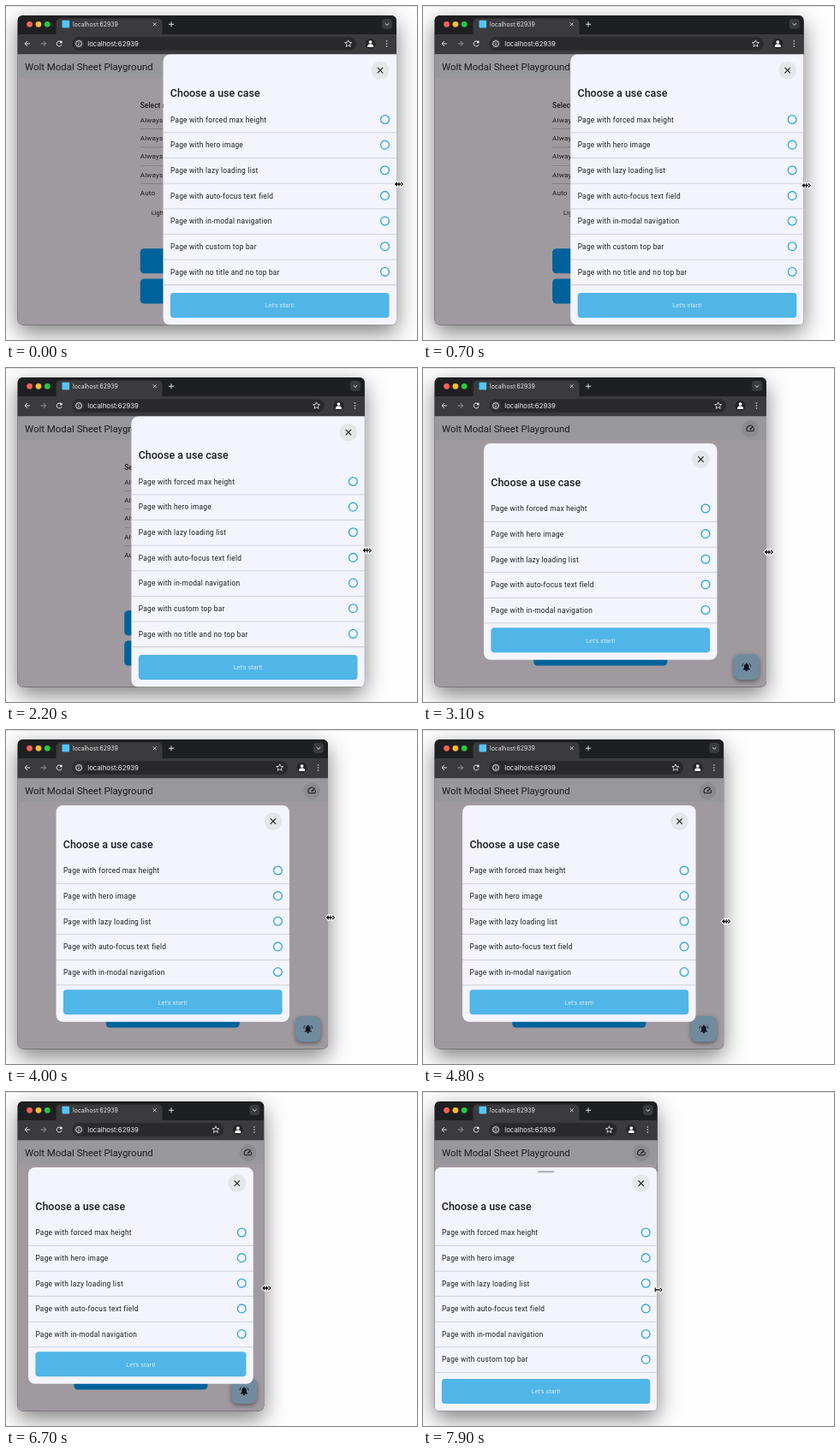
An HTML page with a canvas for the animation above (8 s loop, 480 by 390 pixels).

```html
<!DOCTYPE html>
<html lang="en">
<head>
<meta charset="utf-8">
<title>Resizing a modal sheet</title>
<style>
html, body { margin: 0; width: 100%; height: 100%; overflow: hidden; background: #fff; }
canvas { display: block; width: 480px; height: 390px; }
</style>
</head>
<body>
<canvas id="stage"></canvas>
<script>
const W = 480, H = 390, LOOP = 8000, STEP = 100;
const LEFT = 13.5, TOP = 11, PAGE_TOP = 56.5, BOTTOM = 372.5;
const SCALE = 0.52;
const SHEET_WIDTH = 524 * SCALE, DIALOG_BREAKPOINT = 768 * SCALE, MIN_RIGHT = 273.7;
const ROW = 57 * SCALE;

// time, right edge of the window, pointer y
const drag = [
  [0, 456, 208], [900, 441.5, 210], [1400, 434, 211], [1800, 426, 212],
  [2700, 410, 214], [3100, 401, 215], [3600, 384.5, 217], [4000, 376, 219],
  [4500, 358.5, 222], [5400, 336.5, 226.5], [5500, 333.5, 227], [6300, 308, 228.5],
  [6700, 301.3, 229], [7200, 289, 230], [7600, MIN_RIGHT, 231], [8000, MIN_RIGHT, 231]
];

const useCases = [
  'Page with forced max height', 'Page with hero image', 'Page with lazy loading list',
  'Page with auto-focus text field', 'Page with in-modal navigation',
  'Page with custom top bar', 'Page with no title and no top bar'
];

const canvas = document.getElementById('stage');
const ctx = canvas.getContext('2d');
const dpr = window.devicePixelRatio || 1;
canvas.width = W * dpr;
canvas.height = H * dpr;

function dragAt(t) {
  const i = Math.max(1, drag.findIndex(k => k[0] > t));
  const [t0, r0, y0] = drag[i - 1], [t1, r1, y1] = drag[i];
  const p = (t - t0) / (t1 - t0);
  return { right: r0 + (r1 - r0) * p, y: y0 + (y1 - y0) * p };
}

function box(x, y, w, h, radius, fill) {
  ctx.beginPath();
  ctx.roundRect(x, y, w, h, radius);
  ctx.fillStyle = fill;
  ctx.fill();
}

function disc(x, y, r, fill) {
  ctx.beginPath();
  ctx.arc(x, y, r, 0, Math.PI * 2);
  ctx.fillStyle = fill;
  ctx.fill();
}

function ring(x, y, r, color, width, from = 0, to = Math.PI * 2) {
  ctx.beginPath();
  ctx.arc(x, y, r, from, to);
  ctx.strokeStyle = color;
  ctx.lineWidth = width;
  ctx.stroke();
}

function line(color, width, ...points) {
  ctx.beginPath();
  points.forEach(([x, y]) => ctx.lineTo(x, y));
  ctx.strokeStyle = color;
  ctx.lineWidth = width;
  ctx.stroke();
}

function label(str, x, y, size, color, { weight = 400, spacing = 0, align = 'left', font = 'Roboto' } = {}) {
  ctx.font = `${weight} ${size}px ${font}, sans-serif`;
  ctx.letterSpacing = spacing + 'px';
  ctx.textAlign = align;
  ctx.textBaseline = 'alphabetic';
  ctx.fillStyle = color;
  ctx.fillText(str, x, y + size * 0.355);
}

function cross(x, y, r, color, width) {
  line(color, width, [x - r, y - r], [x + r, y + r]);
  line(color, width, [x - r, y + r], [x + r, y - r]);
}

function arrow(x, y, dir, color) {
  line(color, 1, [x - 3 * dir, y], [x + 3 * dir, y]);
  line(color, 1, [x, y - 3], [x + 3 * dir, y], [x, y + 3]);
}

function star(x, y) {
  const points = Array.from({ length: 11 }, (_, i) => {
    const a = i * Math.PI / 5 - Math.PI / 2, r = i % 2 ? 1.9 : 4.2;
    return [x + r * Math.cos(a), y + r * Math.sin(a)];
  });
  line('#dedee0', 0.9, ...points);
}

function drawTabs(right) {
  const y = 21.3;
  box(LEFT, TOP, right - LEFT, 24, 0, '#1e1f21');
  ['#ff5f57', '#febc2e', '#28c840'].forEach((c, i) => disc(27.6 + i * 10.3, y, 3.4, c));
  box(58.5, 14.5, 124, 20, [5, 5, 0, 0], '#3b3b3d');
  box(65.5, 16.8, 8.6, 8.6, 1, '#54c5f8');
  label('localhost:62939', 78, y, 6.9, '#e6e6e8', { font: 'Inter' });
  cross(173.7, y, 1.9, '#dedee0', 0.9);
  line('#dedee0', 1, [190, y], [196, y]);
  line('#dedee0', 1, [193, y - 3], [193, y + 3]);
  box(right - 17, 15, 12, 12, 4, '#3a3b3d');
  line('#e6e6e8', 1, [right - 13.2, y - 1], [right - 11, y + 1.1], [right - 8.8, y - 1]);
}

function drawToolbar(right) {
  const y = 44;
  box(LEFT, 33, right - LEFT, 24, 0, '#3b3b3d');
  arrow(25, y, -1, '#dedee0');
  arrow(43.7, y, 1, '#98989b');
  ring(62.2, y, 3, '#dedee0', 1, 0.3, 5.5);
  box(63, 40.8, 2.6, 2.6, 0, '#dedee0');
  box(77.5, 36.3, right - 124.5, 15.4, 7.7, '#29292b');
  disc(85, y, 5.6, '#3d3d40');
  ring(85, y, 3.4, '#e4e4e6', 0.9);
  line('#e4e4e6', 0.9, [85, y - 0.3], [85, y + 1.9]);
  disc(85, y - 1.6, 0.5, '#e4e4e6');
  label('localhost:62939', 95.3, y, 7.8, '#ececee', { font: 'Inter' });
  star(right - 56.3, y);
  disc(right - 30.4, y, 6, '#242426');
  disc(right - 30.4, y - 1.9, 1.9, '#fff');
  box(right - 33.8, y + 0.5, 6.8, 3.4, [2.5, 2.5, 0.5, 0.5], '#fff');
  [-3, 0, 3].forEach(d => disc(right - 11.4, y + d, 0.8, '#dedee0'));
}

function drawSpeedButton(x, y) {
  disc(x, y, 10, '#8b8b90');
  ring(x, y + 0.4, 4.3, '#1b1a1d', 1.1, Math.PI * 0.83, Math.PI * 1.78);
  ring(x, y + 0.4, 4.3, '#1b1a1d', 1.1, Math.PI * 1.9, Math.PI * 2.17);
  line('#1b1a1d', 1, [x - 3.9, y + 2.7], [x + 3.9, y + 2.7]);
  line('#1b1a1d', 1.5, [x - 0.5, y + 1], [x + 3.2, y - 2.5]);
}

function drawBellButton(x, y) {
  ctx.save();
  ctx.shadowColor = 'rgba(0,0,0,.42)';
  ctx.shadowBlur = 5 * dpr;
  ctx.shadowOffsetY = 2 * dpr;
  box(x - 15, y - 15, 30, 30, 8, '#718b9e');
  ctx.restore();
  const ink = '#0c1720';
  box(x - 2.8, y - 3.6, 5.6, 6.6, [2.8, 2.8, 0, 0], ink);
  box(x - 4, y + 2.3, 8, 1.2, 0, ink);
  disc(x, y - 3.8, 0.9, ink);
  disc(x, y + 4.2, 1.1, ink);
  ring(x, y - 0.5, 5, ink, 0.9, Math.PI, Math.PI * 1.26);
  ring(x, y - 0.5, 5, ink, 0.9, Math.PI * 1.74, Math.PI * 2);
}

function drawPage(right) {
  const center = (LEFT + right) / 2, x = center - 78;
  const ink = '#1c1a1d';
  box(LEFT, PAGE_TOP, right - LEFT, BOTTOM - PAGE_TOP, 0, '#9f9a9f');
  box(LEFT, PAGE_TOP, right - LEFT, 27.5, 0, '#98989c');
  label('Wolt Modal Sheet Playground', 22, 70.5, 11.44, ink);
  drawSpeedButton(right - 18.8, 71);

  label('Select modal', x, 116.2, 8.32, ink, { weight: 500, spacing: 0.08 });
  for (let i = 0; i < 5; i++) {
    const y = 133 + i * 21.3;
    label(i < 4 ? 'Always show' : 'Auto', x, y, 8.1, ink, { spacing: 0.15 });
    if (i < 4) box(x, y + 10.3, 156, 0.7, 0, '#77737a');
  }
  label('Light', center - 65, 241.5, 7.28, ink, { spacing: 0.05 });
  [283.3, 318.5].forEach(y => box(x, y, 156, 29, 4.5, '#00629a'));
  drawBellButton(right - 23.2, 349);
}

function sheetFor(right) {
  const width = right - LEFT;
  if (width < SHEET_WIDTH)
    return { x: LEFT, y: 88, w: width, bottom: BOTTOM, rows: 6, radius: [8, 8, 0, 0], handle: true };
  if (width < DIALOG_BREAKPOINT) {
    const w = Math.min(SHEET_WIDTH, width - 25);
    return { x: LEFT + (width - w) / 2, y: 88, w, bottom: 340.8, rows: 5, radius: 8 };
  }
  return { x: right - SHEET_WIDTH, y: PAGE_TOP, w: SHEET_WIDTH, bottom: BOTTOM, rows: 7, radius: [8, 0, 0, 8] };
}

function drawSheet({ x, y, w, bottom, rows, radius, handle }) {
  const end = x + w, ink = '#1b1c20';
  box(x, y, w, bottom - y, radius, '#f3f4fc');
  if (handle) box(x + w / 2 - 9.7, y + 4, 19.4, 2.3, 1.1, '#b3b4b9');
  disc(end - 19, y + 18.6, 10.4, '#e5e6ea');
  cross(end - 19, y + 18.6, 3.2, '#1b1c20', 1.1);
  label('Choose a use case', x + 8.3, y + 45.4, 12.48, ink, { weight: 500 });

  useCases.slice(0, rows).forEach((name, i) => {
    const rowY = y + 76.3 + i * ROW;
    label(name, x + 8.4, rowY, 8.32, ink, { spacing: 0.26 });
    ring(end - 13.5, rowY - 0.3, 4.9, '#2ea6dc', 1.3);
    box(x, rowY + 14.7, w, 0.8, 0, '#c5c7ce');
  });

  box(x + 8.4, bottom - 37.5, w - 16.8, 29, 4, '#50b5e7');
  label("Let's start!", x + w / 2, bottom - 22.8, 7.28, '#d3eefb', { align: 'center', spacing: 0.05 });
}

function drawPointer(x, y, single) {
  const shape = () => {
    ctx.beginPath();
    const heads = single ? [1] : [-1, 1];
    heads.forEach(d => {
      ctx.moveTo(x + 5.3 * d, y);
      ctx.lineTo(x + 2.2 * d, y - 3);
      ctx.lineTo(x + 2.2 * d, y + 3);
      ctx.closePath();
    });
    ctx.rect(x - 3.5, y - 0.7, 7, 1.4);
    ctx.rect(single ? x - 3.8 : x - 0.6, y - 2.6, 1.2, 5.2);
  };
  ctx.lineJoin = 'round';
  shape();
  ctx.strokeStyle = '#fff';
  ctx.lineWidth = 2;
  ctx.stroke();
  shape();
  ctx.fillStyle = '#111';
  ctx.fill();
  ctx.lineJoin = 'miter';
}

function draw(t) {
  const { right, y } = dragAt(t);
  const atLimit = right <= MIN_RIGHT;
  ctx.setTransform(dpr, 0, 0, dpr, 0, 0);
  box(0, 0, W, H, 0, '#fefefe');
  box(0, 0, W, 1, 0, '#e3e3e5');

  ctx.save();
  ctx.shadowColor = 'rgba(0,0,0,.5)';
  ctx.shadowBlur = 26 * dpr;
  ctx.shadowOffsetY = 9 * dpr;
  box(LEFT, TOP, right - LEFT, BOTTOM - TOP, 6, '#333');
  ctx.restore();

  ctx.save();
  ctx.beginPath();
  ctx.roundRect(LEFT, TOP, right - LEFT, BOTTOM - TOP, 6);
  ctx.clip();
  drawTabs(right);
  drawToolbar(right);
  drawPage(right);
  drawSheet(sheetFor(right));
  ctx.restore();

  drawPointer(right + (atLimit ? 0.8 : 3), y, atLimit);
}

function tick() {
  const t = performance.now() % LOOP;
  draw(Math.floor(t / STEP) * STEP);
  requestAnimationFrame(tick);
}
tick();
</script>
</body>
</html>
```
